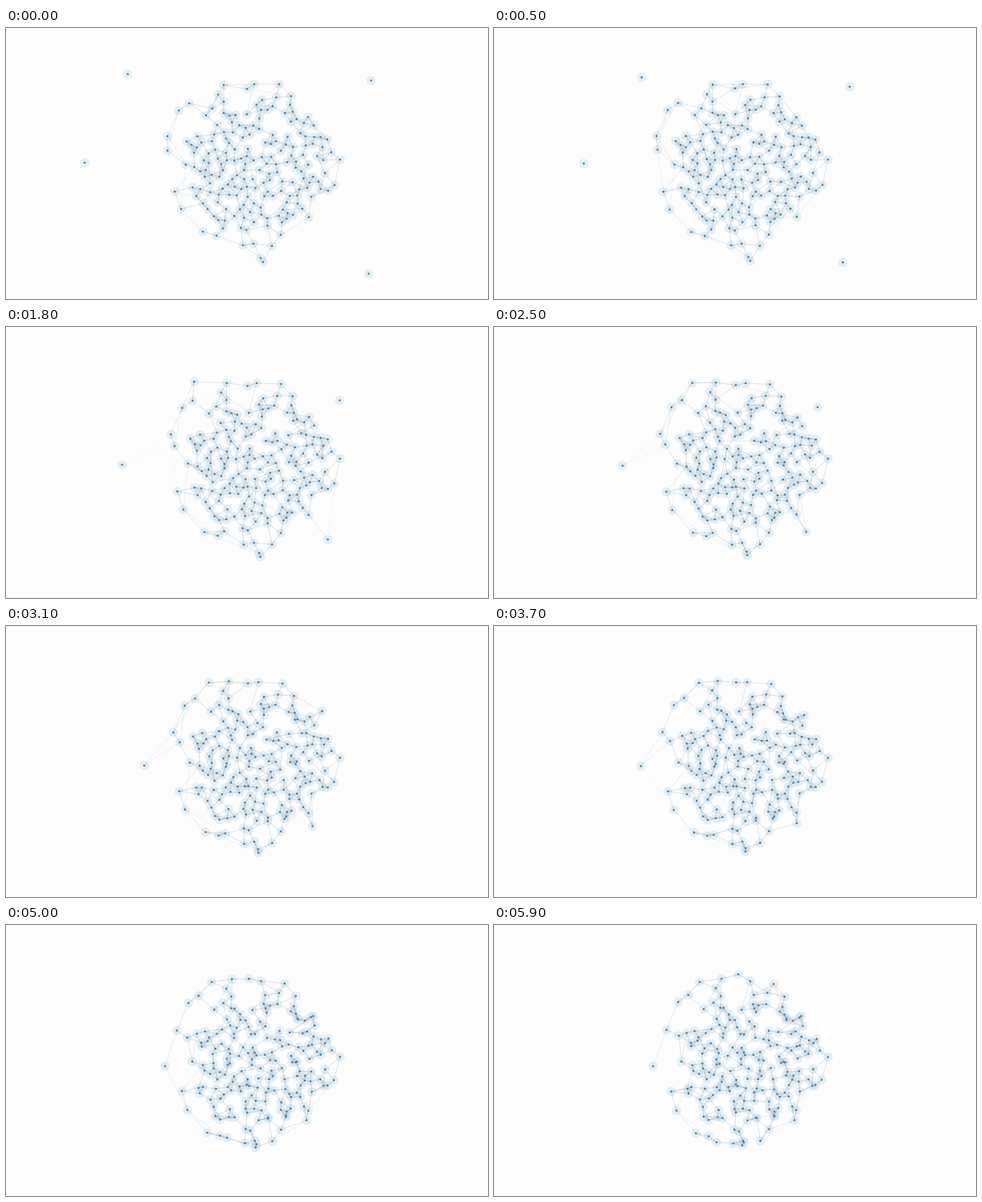
These frames come from a looping animation (600x338 px, 6000 ms). An HTML page with a canvas:

```html
<!DOCTYPE html>
<html lang="en">
<head>
<meta charset="utf-8">
<title>Particle network</title>
<style>
  html, body { margin: 0; width: 100%; height: 100%; overflow: hidden; background: #fdfdfe; }
  canvas { display: block; width: 600px; height: 338px; }
</style>
</head>
<body>
<canvas id="stage" width="600" height="338"></canvas>
<script>
const LOOP = 6000, STEP = 100, LAST = 5900;
const CX = 308, CY = 170;
const REACH = 82, MAX_LINKS = 4;
const INNER = 158, GAP = 7;
const ctx = document.getElementById('stage').getContext('2d');

// Nodes with a path of their own; they link once `join` has passed.
const movers = [
  { from: [151.5, 57.5], to: [256, 71], power: 3.5, time: 5000, join: 900 },
  { from: [98, 168], to: [198, 176], power: 1.4, time: 5000, join: 1700 },
  { from: [454.5, 65.5], to: [382.5, 113.5], power: 1.4, time: 4200, join: 2600 },
  { from: [451.5, 306.5], to: [374, 243.5], power: 2.4, time: 5000, join: 900 },
  { from: [300, 76], to: [304, 61.5], power: 0.5, time: LAST, join: 0 },
  { from: [201, 153], to: [230, 138], power: 1, time: LAST, join: 0 },
  { from: [270, 250], to: [277, 271], power: 0.7, time: LAST, join: 0 },
  { from: [320, 292], to: [309, 275], power: 1, time: LAST, join: 0 },
  { from: [317, 287], to: [311, 271], power: 1, time: LAST, join: 0 }
];

// Outline of the swarm, clockwise from the top.
const rim = [
  [309, 70], [340, 70], [355, 85], [376, 111], [400, 139], [405, 155], [416, 164],
  [397, 181], [409, 196], [401, 203], [377, 236], [342, 258], [331, 272], [308, 269],
  [295, 271], [262, 259], [245, 254], [218, 226], [210, 204], [201, 135], [238, 135],
  [215, 103], [228, 94], [249, 109], [264, 83], [271, 71], [271, 92], [271, 106]
];

// Open patches inside the swarm: x, y, radius.
const holes = [[236, 113, 22], [284, 95, 9], [340, 119, 13], [230, 186, 12], [281, 247, 10]];

function seeded(seed) {
  return () => {
    seed = (seed + 0x6D2B79F5) | 0;
    let n = Math.imul(seed ^ (seed >>> 15), 1 | seed);
    n = (n + Math.imul(n ^ (n >>> 7), 61 | n)) ^ n;
    return ((n ^ (n >>> 14)) >>> 0) / 4294967296;
  };
}

const rand = seeded(27);
const spread = size => (rand() * 2 - 1) * size;
const mix = (a, b, u) => a + (b - a) * u;

// The swarm narrows, and its quarters slide past each other.
function drifter(x, y, jitter) {
  const rx = x - CX, ry = y - CY;
  return {
    x, y,
    dx: 6 - 0.06 * rx - 0.04 * ry + spread(jitter),
    dy: -0.0011 * rx * ry + spread(jitter)
  };
}

const drifters = rim.map(([x, y]) => drifter(x, y, 0));

function blocked(x, y) {
  return holes.some(([hx, hy, r]) => Math.hypot(hx - x, hy - y) < r)
    || drifters.some(p => Math.hypot(p.x - x, p.y - y) < GAP);
}

for (let n = 0; n < INNER; n++) {
  let x, y, tries = 0;
  do {
    const angle = rand() * Math.PI * 2, r = rand() ** 0.58;
    x = CX + 2 + 90 * r * Math.cos(angle);
    y = CY - 2 + 86 * r * Math.sin(angle);
  } while (++tries < 80 && blocked(x, y));
  drifters.push(drifter(x, y, 5));
}

function nodesAt(t) {
  const own = movers.map(({ from, to, power, time, join }) => {
    const u = 1 - (1 - Math.min(t / time, 1)) ** power;
    return { x: mix(from[0], to[0], u), y: mix(from[1], to[1], u), links: 0, open: t >= join };
  });
  const u = t / LAST;
  const rest = drifters.map(p => ({ x: p.x + p.dx * u, y: p.y + p.dy * u, links: 0, open: true }));
  return own.concat(rest);
}

// Close pairs link first, with a fixed bias per pair, until a node is full.
function linksOf(nodes) {
  const pairs = [];
  nodes.forEach((a, i) => {
    for (let j = i + 1; j < nodes.length; j++) {
      const b = nodes[j], d = Math.hypot(a.x - b.x, a.y - b.y);
      const bias = 1 + ((i * 7 + j * 13) % 10) / 8;
      if (a.open && b.open && d < REACH) pairs.push({ a, b, d, rank: d * bias });
    }
  });
  pairs.sort((p, q) => p.rank - q.rank);
  return pairs.filter(({ a, b }) => {
    const ok = a.links < MAX_LINKS && b.links < MAX_LINKS;
    if (ok) { a.links++; b.links++; }
    return ok;
  });
}

function dots(nodes, radius, color) {
  ctx.fillStyle = color;
  for (const { x, y } of nodes) {
    ctx.beginPath();
    ctx.arc(x, y, radius, 0, Math.PI * 2);
    ctx.fill();
  }
}

function draw(t) {
  const nodes = nodesAt(t);
  ctx.fillStyle = '#fdfdfe';
  ctx.fillRect(0, 0, 600, 338);
  dots(nodes, 5.8, 'rgba(198, 222, 237, 0.48)');
  ctx.lineWidth = 0.6;
  for (const { a, b, d } of linksOf(nodes)) {
    ctx.strokeStyle = `rgba(100, 115, 128, ${0.5 * (1 - d / REACH)})`;
    ctx.beginPath();
    ctx.moveTo(a.x, a.y);
    ctx.lineTo(b.x, b.y);
    ctx.stroke();
  }
  dots(nodes, 1.3, '#527a98');
}

const start = performance.now();
let shown = -1;
function tick() {
  const t = Math.floor(((performance.now() - start) % LOOP) / STEP) * STEP;
  if (t !== shown) draw(shown = t);
  requestAnimationFrame(tick);
}
tick();
</script>
</body>
</html>
```
